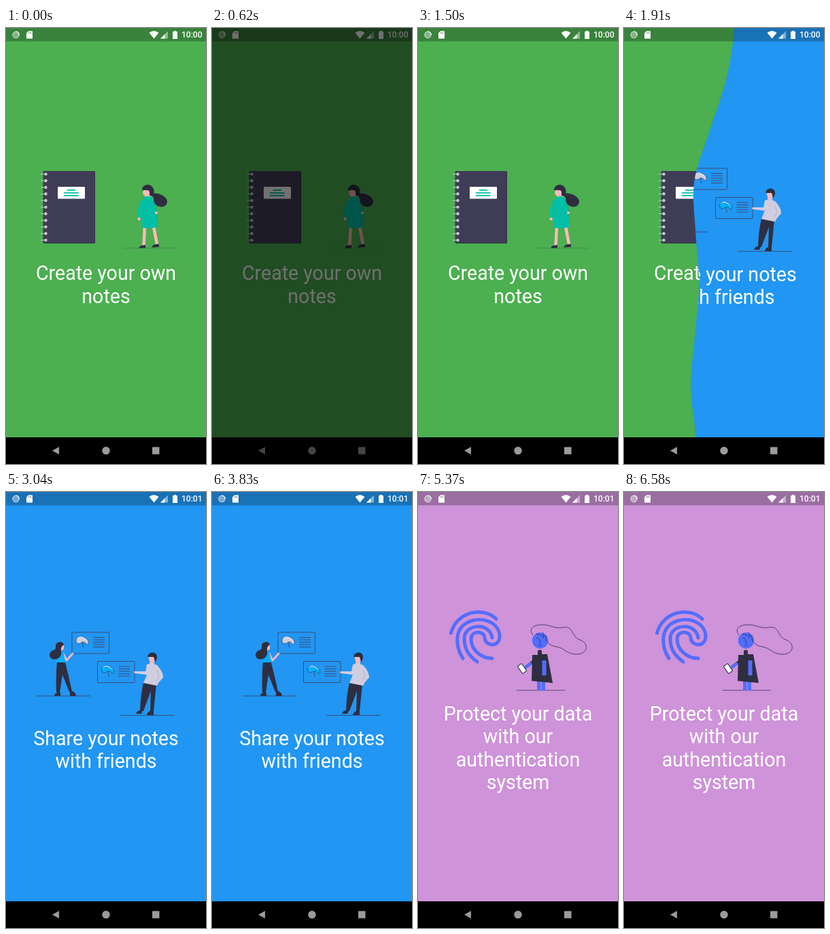
Animation of 294x637 px, one loop 6620 ms. Source, as an HTML page:

```html
<!DOCTYPE html>
<html lang="en">
<head>
<meta charset="utf-8">
<title>Notes onboarding</title>
<style>
  html, body { margin: 0; width: 100%; height: 100%; overflow: hidden; background: #000; }
  svg { display: block; width: 100%; height: 100%; }
  text { font-family: Roboto, sans-serif; fill: #fff; }
  .title { font-size: 28.6px; text-anchor: middle; }
  .line { fill: none; stroke: #3f3d56; stroke-width: .8; }
  .dark { fill: #2f2e41; }
  .skin { fill: #ffb8b8; }
  .limb { fill: none; stroke-linecap: round; stroke-linejoin: round; }
</style>
</head>
<body>
<svg viewBox="0 0 294 637">
  <defs>
    <clipPath id="clip1"><path id="wave1"/></clipPath>
    <clipPath id="clip2"><path id="wave2"/></clipPath>
    <g id="card">
      <rect class="line" width="54.5" height="31" rx="1"/>
      <path class="line" d="M31 7.5h17M31 11h17M31 14.500h17M31 18h17M31 21.500h17"/>
      <path d="M6 12C6 4 20 5 24 13C25 17 22 19 21 17C19 14 16 13 14 15C10 18 6 16 6 12Z" stroke="#2f2e41" stroke-width=".6"/>
      <path d="M8 9C11 5 18 7 22 12" fill="none" stroke="#fff"/>
      <path class="line" d="M15 14L17 22"/>
    </g>
  </defs>

  <g id="create">
    <rect width="294" height="598" fill="#4caf50"/>
    <rect x="54.500" y="209" width="76.500" height="105.500" rx="1" fill="#3f3d56"/>
    <path d="M130.500 210V314H56" fill="none" stroke="#2f2e41"/>
    <g id="rings"></g>
    <rect x="76" y="232" width="40" height="17.500" rx="1" fill="#fff"/>
    <path d="M90.500 236.800h11M85.500 240.800h20.500M85.500 244.800h20.500" stroke="#00bfa6" stroke-width="1.700" stroke-linecap="round"/>
    <path class="line" d="M173 321.500H250" opacity=".35"/>
    <path class="limb" d="M204 290L202.500 317M217 290L222 316" stroke="#ffb8b8" stroke-width="4.500"/>
    <path class="dark" d="M195.500 321.500Q196 318 201 317.500L205 317V321.500ZM214 320.500Q215 317 220 316L224.500 315.500L225 320Z"/>
    <path class="skin" d="M204 240H213V251H204Z"/>
    <path class="dark" d="M200 236C201 227 215 226 217.500 237C218 243 215 246 211 245L211 239Z"/>
    <circle class="skin" cx="206" cy="240.500" r="4.800"/>
    <path class="dark" d="M200 237C203 228 214 229 217 239Q208 236 200 237ZM215 242C222 240 237 245 237 254C236 264 222 263 218 255C216 251 219 248 214 245Z"/>
    <path class="limb" d="M201 253L195.500 267L196 278" stroke="#00bfa6" stroke-width="5"/>
    <path d="M203 247Q210 244 215 248L220 261L223 290Q207 296 199 290L200 262Z" fill="#00bfa6"/>
    <path d="M216 254Q226 267 219 281" fill="none" stroke="#00a891"/>
    <circle class="skin" cx="195.500" cy="279" r="2.200"/>
    <circle class="skin" cx="221" cy="270" r="2"/>
    <text class="title" x="147" y="368">Create your own</text>
    <text class="title" x="147" y="401.500">notes</text>
  </g>

  <g clip-path="url(#clip1)">
    <rect width="294" height="598" fill="#2196f3"/>
    <use href="#card" x="97" y="205" fill="#d0cde1"/>
    <use href="#card" x="134.500" y="247.500" fill="#00b0ff"/>
    <path class="line" d="M45 298H123.500M168 326.300H247.500"/>
    <path class="limb" d="M84 236L89 246L98 236" stroke="#ffb8b8" stroke-width="2.800"/>
    <circle class="skin" cx="81" cy="227" r="4.500"/>
    <path d="M77 234Q82 231 85 236L87 249H74Z" fill="#00b0ff"/>
    <path class="dark" d="M73 225C73 218 84 217 85 223Q80 226 81 232C83 241 75 246 68 244C62 241 63 233 70 231Q74 230 73 225Z"/>
    <path class="dark" d="M75 249H87L91 265L97 291L93 292L83 267L79 293H74Q73 268 75 249ZM71 298Q71 294 76 293H80V298ZM94 298L94 291H98Q102 293 103 296L102 298Z"/>
    <circle class="skin" cx="215" cy="242.500" r="5.200"/>
    <path class="skin" d="M211 244H218V252H211Z"/>
    <path class="dark" d="M208.500 241C208 233 221 232 222 240Q222 246 219 248L217 241Z"/>
    <path class="dark" d="M202 279L221 281L217 320H212L213 291L202 320H197Q198 294 202 279ZM191 324Q193 319 197 319H201L199 324ZM207 326Q208 321 212 320H217V326Z"/>
    <path d="M207 252Q214 249 222 253Q231 262 231 271L224 279L222 283L202 279L207 267L191 265V262L205 262Z" fill="#d0cde1"/>
    <path d="M222 260L225 268L221 277" fill="none" stroke="#a9a7b8" stroke-width=".7"/>
    <circle class="skin" cx="190" cy="263.500" r="1.800"/>
    <circle class="skin" cx="221.500" cy="280" r="1.800"/>
    <text class="title" x="147" y="369.500">Share your notes</text>
    <text class="title" x="147" y="403">with friends</text>
  </g>

  <g clip-path="url(#clip2)">
    <rect width="294" height="598" fill="#ce93d8"/>
    <g class="limb" stroke="#536dfe" stroke-width="5">
      <path d="M48.500 206C57 174 96 167 115 185.500"/>
      <path d="M66 243C56 228 52 202 72 191C95 179 121 192 120 212C119 227 99 226 98 213C97 202 78 202 78 215C78 230 92 243 109 243"/>
      <path d="M87 248C73 238 68 228 68 214C68 192 106 190 109 213"/>
    </g>
    <path class="line" d="M145 289.700H216"/>
    <path d="M175 277h5.500v13h-5.500zM181.500 277h5.500v13h-5.500z" fill="#536dfe"/>
    <circle cx="179.500" cy="217" r="11.700" fill="#536dfe"/>
    <path class="line" d="M169 209C162 201 169 194 181 194C194 193 199 200 212 198C229 194 225 212 238 216C252 221 250 237 233 237C218 237 216 228 203 226C191 224 187 217 188 209M174 207L186 211L183 205M177 213L180 220L178 221M174 214L176 212M183 214L185 212M177 224Q180 225 182 223" style="stroke:#2f2e41"/>
    <path class="dark" d="M176 232Q179 229 182 232V237H190L198 279L167 276L168 238H176Z"/>
    <path d="M182.500 246h6v22h-6z" fill="#536dfe"/>
    <path class="limb" d="M170 247L158 256" stroke="#2f2e41" stroke-width="4"/>
    <path class="limb" d="M165 251L156 258" stroke="#536dfe" stroke-width="4.500"/>
    <rect x="-3.700" y="-6.500" width="7.400" height="13" rx="1" fill="#fff" stroke="#2f2e41" transform="translate(153 258) rotate(-35)"/>
    <text class="title" x="147" y="333.500">Protect your data</text>
    <text class="title" x="147" y="367">with our</text>
    <text class="title" x="147" y="400.500">authentication</text>
    <text class="title" x="147" y="434">system</text>
  </g>

  <rect width="294" height="19.500" opacity=".25"/>
  <circle cx="14.500" cy="10" r="4.800" fill="#fff" fill-opacity=".4" stroke="#fff" stroke-opacity=".65"/>
  <path d="M14.500 5.200A4.800 4.800 0 0 1 19.300 10" fill="none" stroke="#fff" stroke-width="1.300"/>
  <path d="M33 4.500H39V15.500H30V7.500Z" fill="#fff"/>
  <path d="M33.500 6v2.500M35.300 6v2.500M37.100 6v2.500" stroke="#777" stroke-width=".8"/>
  <path d="M210.500 7Q217.500 1.500 224.500 7L217.500 15.500Z" fill="#fff"/>
  <path d="M238 4.500V15.500H227Z" fill="#fff" opacity=".45"/>
  <path d="M233.500 9V15.500H227Z" fill="#fff"/>
  <path d="M247 4h3v1.200h2V16h-7V5.200h2z" fill="#fff"/>
  <text id="clock" x="258" y="14.300" font-size="12" font-weight="500"></text>
  <rect y="598" width="294" height="39"/>
  <g fill="#9b9b9b">
    <path d="M68 617.500L78 612V623Z"/>
    <circle cx="147" cy="617.500" r="5.700"/>
    <rect x="215" y="612.300" width="10.500" height="10.500" rx=".5"/>
  </g>
  <rect id="shade" width="294" height="637"/>
</svg>
<script>
const LOOP = 6620, SWIPE = 760, W = 294, H = 598;
const $ = id => document.getElementById(id);
const clamp = v => Math.max(0, Math.min(1, v));

// Horizontal offsets of each wave front, evenly spaced from top to bottom
const swipes = [
  { path: $('wave1'), start: 1465, bends: [53, 41, 17, -6, -4, 1, -5, -11, -4] },
  { path: $('wave2'), start: 3779, bends: [25, 21, 8, 1, 10, 14, -2, -22, -23] }
];

for (let i = 0; i < 11; i++) {
  const y = 213.5 + i * 9.65;
  $('rings').innerHTML += `<circle cx="58.500" cy="${y}" r="2.100" fill="#f2f2f2"/>
    <path d="M51 ${y}H58.500" stroke="#d0cde1" stroke-width=".9"/>
    <circle cx="58.700" cy="${y}" r=".7" fill="#3f3d56"/>`;
}

function wavePath(bends, p) {
  const base = 364 - 434 * p, n = bends.length - 1, step = H / n;
  const x = i => base + bends[Math.max(0, Math.min(n, i))];
  let d = `M${x(0)} 0`;
  for (let i = 0; i < n; i++) {
    const y = i * step;
    d += `C${x(i) + (x(i + 1) - x(i - 1)) / 6} ${y + step / 3} ` +
      `${x(i + 1) - (x(i + 2) - x(i)) / 6} ${y + step * 2 / 3} ${x(i + 1)} ${y + step}`;
  }
  return d + `L${W + 200} ${H}V0Z`;
}

function draw(now) {
  const t = now % LOOP;
  for (const { path, start, bends } of swipes) {
    const p = clamp((t - start) / SWIPE);
    path.setAttribute('d', p > 0 ? wavePath(bends, p) : 'M0 0');
  }
  const shade = t < 1120 ? clamp((t - 70) / 980) : clamp((1370 - t) / 250);
  $('shade').setAttribute('opacity', shade);
  $('clock').textContent = t < 2450 ? '10:00' : '10:01';
}

const begin = performance.now();
function tick() {
  draw(performance.now() - begin);
  requestAnimationFrame(tick);
}
tick();
</script>
</body>
</html>
```
